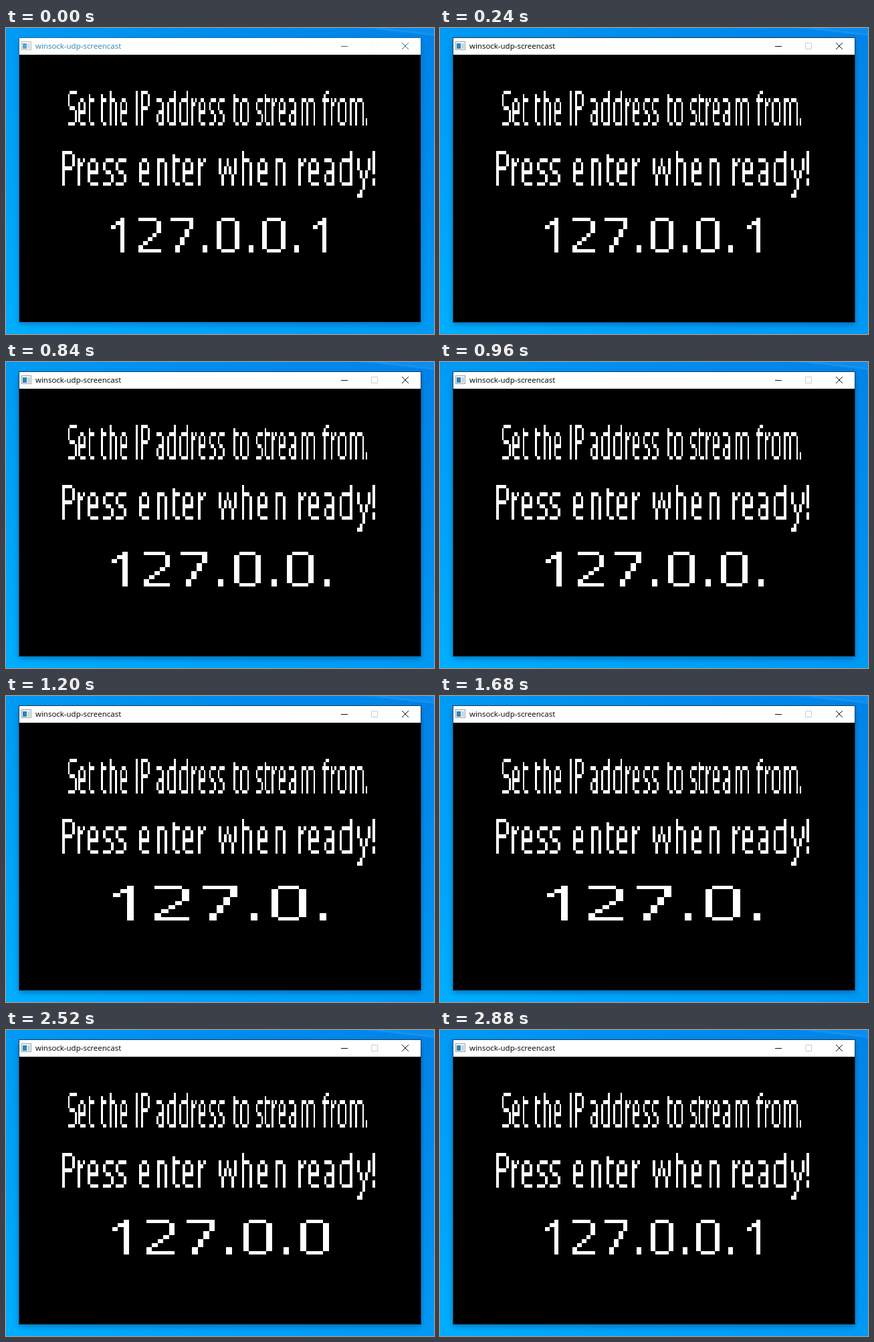
An HTML page for the animation above (3000 ms loop, 640 by 458 pixels).

```html
<!DOCTYPE html>
<html lang="en">
<head>
<meta charset="utf-8">
<title>winsock-udp-screencast</title>
<style>
html, body { margin: 0; width: 100%; height: 100%; overflow: hidden; background: #0096f0; }
svg { display: block; width: 640px; height: 458px; }
.title { font: 11.5px "Open Sans", "Noto Sans", sans-serif; }
.pixels { fill: none; stroke: #fff; stroke-linecap: square; shape-rendering: crispEdges; }
.inactive .title { fill: #2f84ac; }
.inactive .maximize { stroke: #f8f8f8; }
.inactive .minimize { stroke: #55606a; }
.inactive .close { stroke: #2a7296; }
.inactive .shadow { opacity: .4; }
.inactive .border { stroke: #1470b0; }
.inactive .icon { opacity: .75; }
</style>
</head>
<body>
<svg id="stage" viewBox="0 0 640 458">
  <defs>
    <linearGradient id="sky" x2="1" y2="0">
      <stop stop-color="#00aaff"/><stop offset=".5" stop-color="#0096f6"/><stop offset="1" stop-color="#0088ee"/>
    </linearGradient>
    <linearGradient id="glow" x2="0" y2="1">
      <stop stop-color="#0078dc" stop-opacity=".3"/><stop offset="1" stop-color="#00b4ff" stop-opacity=".4"/>
    </linearGradient>
    <filter id="soft" x="-10%" y="-10%" width="120%" height="120%"><feGaussianBlur stdDeviation="5"/></filter>
  </defs>
  <rect width="640" height="458" fill="url(#sky)"/>
  <rect width="640" height="458" fill="url(#glow)"/>
  <path d="M530 0L640 12V0z" fill="#28a0f5" opacity=".3"/>
  <path d="M555 0L640 10" stroke="#48b4fa" opacity=".35"/>
  <rect class="shadow" x="20" y="19" width="600" height="424" fill="#003a70" opacity=".55" filter="url(#soft)"/>
  <rect class="border" x="19.5" y="14.5" width="601" height="426" fill="#000" stroke="#163e60"/>
  <rect x="20" y="15" width="600" height="25" fill="#fff"/>
  <g class="icon">
    <rect x="23.5" y="20.5" width="14" height="12" fill="#f4f6f7" stroke="#9aa5ac"/>
    <rect x="25" y="23" width="6" height="8" fill="#2d83b8"/>
    <rect x="32" y="23" width="4" height="8" fill="#c5d5df"/>
  </g>
  <text class="title" x="44" y="31">winsock-udp-screencast</text>
  <g fill="none" stroke="#111">
    <path class="minimize" d="M501 27.5h10"/>
    <path class="maximize" d="M546.5 22.5h9v9h-9z" stroke="#ccc"/>
    <path class="close" d="M592 22l10 10m0-10l-10 10"/>
  </g>
</svg>
<script>
const LOOP = 3000;
const BOX_HEIGHT = 100;
const FONT_ROWS = 17;
const CAP_ROW = 4;
const stage = document.getElementById("stage");

// Strokes shared by several letters; capitals are nine rows tall.
const bowl = "M2 2h2M1 3v4M2 8h2";
const arch = "M2 2v6M3 2h1M5 3v5";

// Each glyph: advance in columns, then its strokes.
const glyphs = {
  " ": [3, ""],
  "!": [4, "M1 0v5M1 7v1"],
  ".": [3, "M0 7v1"],
  I: [3, "M1 0v8"],
  P: [6, "M1 0v8M2 0h2M5 1v2M2 4h2"],
  S: [6, "M2 0h3M1 1v2M2 4h2M5 5v2M1 8h3"],
  a: [6, "M1 2h2M4 3v5M2 5h1M1 6v1M2 8h1"],
  d: [7, bowl + "M5 0v8"],
  e: [6, "M2 2h1M1 3v4M4 3v2M2 5h1M2 8h2"],
  f: [4, "M1 1v7M2 0h1M0 2h3"],
  h: [7, "M2 0v2" + arch],
  m: [11, arch + "M6 2h2M9 3v5"],
  n: [7, arch],
  o: [6, bowl + "M5 3v4"],
  r: [4, "M1 2v6M2 3h0M3 2h0"],
  s: [5.5, "M2 2h2M1 3v1M2 5h1M4 6v1M1 8h2"],
  t: [4, "M1 1v6M1 2h2M2 8h1"],
  w: [9, "M2 2v3M3 6v2M4 4v1M5 2v1M6 4v1M7 6v2M8 2v3"],
  y: [6, "M1 2v2M5 2v2M2 5v1M4 5v1M3 7v2M2 10h0M1 11h1"],
  0: [7, "M1 0h2M0 1v6M4 1v6M1 8h2"],
  1: [7, "M3 0v8M2 1h0M1 2h0"],
  2: [7, "M0 0h3M4 1v2M3 4h0M2 5h0M1 6h0M0 7h0M0 8h4"],
  7: [7, "M0 0h4M4 1v1M3 3v1M2 5v1M1 7v1"],
};

function add(parent, tag, attributes) {
  const node = document.createElementNS("http://www.w3.org/2000/svg", tag);
  for (const name in attributes) node.setAttribute(name, attributes[name]);
  return parent.appendChild(node);
}

// A line of text always fills its box, so its column width follows its length.
function makeLine(left, top, boxWidth) {
  const group = add(stage, "g", { class: "pixels", role: "img" });
  const row = BOX_HEIGHT / FONT_ROWS;
  let shown = null;
  return text => {
    if (text === shown) return;
    shown = text;
    group.replaceChildren();
    let x = 0;
    for (const char of text) {
      const [advance, strokes] = glyphs[char];
      add(group, "path", { d: strokes, transform: `translate(${Math.floor(x) + .5} .5)` });
      x += advance;
    }
    group.setAttribute("aria-label", text);
    group.setAttribute("transform", `translate(${left} ${top + CAP_ROW * row}) scale(${boxWidth / x} ${row})`);
  };
}

makeLine(90, 70, 457)("Set the IP address to stream from.");
makeLine(80, 160, 480)("Press enter when ready!");
const showAddress = makeLine(150, 260, 350);

const address = "127.0.0.1";
const deletions = [840, 1020, 1200];
const insertions = [2400, 2640, 2880];

function draw(now) {
  const time = now % LOOP;
  const passed = times => times.filter(t => time >= t).length;
  showAddress(address.slice(0, address.length - passed(deletions) + passed(insertions)));
  stage.classList.toggle("inactive", time < 120);
}

const start = performance.now();
function tick() {
  draw(performance.now() - start);
  requestAnimationFrame(tick);
}
tick();
</script>
</body>
</html>
```
